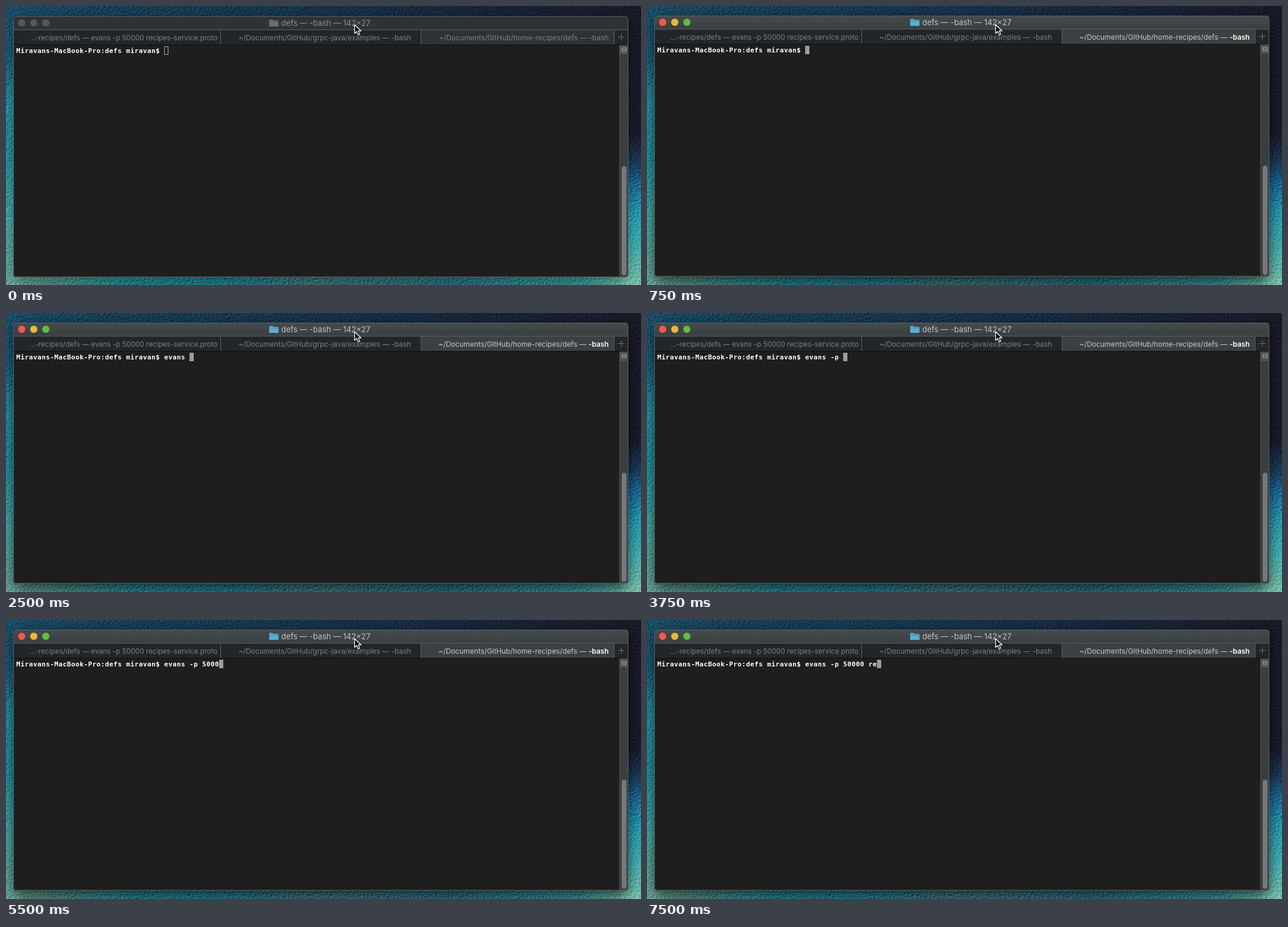
These frames come from a looping animation (1052 px wide and 463 px high, 8 s). An HTML page:

```html
<!DOCTYPE html>
<html lang="en">
<head>
<meta charset="utf-8">
<title>Terminal</title>
<style>
  html, body { margin: 0; width: 100%; height: 100%; overflow: hidden; background: #14283c; }
  svg { display: block; width: 1052px; height: 463px; }
  text { white-space: pre; }
  .ui { font-family: Inter, "Open Sans", sans-serif; font-size: 11.85px; }
  .tab { text-anchor: end; fill: #7d8183; }
  .long { font-size: 11.65px; }
  .title { font-size: 12.9px; fill: #8b9092; }
  .shell { font: 700 11px "DejaVu Sans Mono", "Noto Sans Mono", monospace; letter-spacing: .378px; fill: #fff; }
  .bar { fill: #2e3335; }
  .current { fill: #2d3234; }
  .light { fill: #56595b; }
  .folder { fill: #6a6f71; }
  .focused .bar { fill: url(#barFill); }
  .focused .current { fill: #3b4042; }
  .focused .title { fill: #c3c6c7; }
  .focused .red { fill: #f3584f; }
  .focused .yellow { fill: #e4bb3b; }
  .focused .green { fill: #60bd42; }
  .focused .folder { fill: #58aed2; }
  .focused .here { fill: #c6c9ca; }
  .focused .job { font-weight: 600; fill: #fff; }
  .grain { mix-blend-mode: overlay; }
  .wall { isolation: isolate; }
</style>
</head>
<body>
<svg viewBox="0 0 1052 463" xmlns="http://www.w3.org/2000/svg">
  <defs>
    <linearGradient id="barFill" x2="0" y2="1">
      <stop stop-color="#464b4d"/><stop offset="1" stop-color="#393e40"/>
    </linearGradient>
    <linearGradient id="wallTop">
      <stop stop-color="#1a4c66"/><stop offset=".15" stop-color="#17405a"/>
      <stop offset=".5" stop-color="#16334c"/><stop offset=".75" stop-color="#18253a"/>
      <stop offset="1" stop-color="#1a1a28"/>
    </linearGradient>
    <linearGradient id="wallBottom">
      <stop stop-color="#6aa596"/><stop offset=".08" stop-color="#4d9088"/>
      <stop offset=".2" stop-color="#26848f"/><stop offset=".36" stop-color="#23788c"/>
      <stop offset=".48" stop-color="#3a7478"/><stop offset=".7" stop-color="#2a7080"/>
      <stop offset=".9" stop-color="#3a9095"/><stop offset="1" stop-color="#7cc0aa"/>
    </linearGradient>
    <linearGradient id="wallLeft" x2="0" y2="1">
      <stop stop-color="#1a4c66"/><stop offset=".18" stop-color="#1a5c76"/>
      <stop offset=".34" stop-color="#2291a0"/><stop offset=".52" stop-color="#1f909c"/>
      <stop offset=".75" stop-color="#40a5a2"/><stop offset="1" stop-color="#6aa596"/>
    </linearGradient>
    <linearGradient id="wallRight" x2="0" y2="1">
      <stop stop-color="#1a1a28"/><stop offset=".46" stop-color="#191b2a"/>
      <stop offset=".56" stop-color="#1a3958"/><stop offset=".64" stop-color="#1c6a98"/>
      <stop offset=".74" stop-color="#2799ad"/><stop offset=".86" stop-color="#40aeb0"/>
      <stop offset="1" stop-color="#7cc0aa"/>
    </linearGradient>
    <filter id="rough" x="0" y="0" width="1" height="1" color-interpolation-filters="sRGB">
      <feTurbulence type="fractalNoise" baseFrequency=".3" numOctaves="3" seed="7"/>
      <feDiffuseLighting surfaceScale="1.3" diffuseConstant=".64" lighting-color="#fff">
        <feDistantLight azimuth="225" elevation="52"/>
      </feDiffuseLighting>
    </filter>
    <filter id="blur" x="-10%" y="-20%" width="120%" height="140%">
      <feGaussianBlur stdDeviation="11"/>
    </filter>
    <clipPath id="frame"><rect x="12" y="16" width="1019" height="433" rx="5"/></clipPath>
  </defs>

  <g class="wall">
    <rect width="1052" height="40" fill="url(#wallTop)"/>
    <rect y="430" width="1052" height="33" fill="url(#wallBottom)"/>
    <rect width="24" height="463" fill="url(#wallLeft)"/>
    <rect x="1020" width="32" height="463" fill="url(#wallRight)"/>
    <rect class="grain" width="1052" height="463" filter="url(#rough)"/>
  </g>
  <rect id="shadow" x="12" y="24" width="1019" height="433" rx="5" filter="url(#blur)"/>

  <g id="win">
    <g clip-path="url(#frame)">
      <rect x="12" y="16" width="1019" height="433" fill="#1e1e1e"/>
      <rect class="bar" x="12" y="16" width="1019" height="23"/>
      <rect x="12" y="39" width="1019" height="25" fill="#222628"/>
      <rect class="current" x="688" y="39" width="320" height="24"/>
      <path d="M12 38.5H1031M355.5 39V63M687.5 39V63M1007.5 39V63" stroke="#5b6062" fill="none"/>
      <path d="M12 63.5H1031" stroke="#0d0e0e"/>
      <rect x="1016" y="64" width="15" height="385" fill="#3a3e40"/>
      <path d="M1016.5 64V449" stroke="#4b4f51"/>
      <rect x="1017.5" y="64.5" width="13" height="14" fill="#484c4e" stroke="#5d6163"/>
      <path d="M1020.5 68.5h7v6h-7zM1020.5 71.5h7" fill="none" stroke="#a9acad"/>
      <rect x="1020" y="265" width="8" height="181" rx="4" fill="#74787a"/>
    </g>
    <rect x="12.5" y="16.5" width="1018" height="432" rx="5" fill="none" stroke="#5a5f61"/>

    <circle class="light red" cx="26" cy="27" r="6"/>
    <circle class="light yellow" cx="46" cy="27" r="6"/>
    <circle class="light green" cx="66" cy="27" r="6"/>
    <path class="folder" d="M436 23q0-1.5 1.5-1.5h4l1.5 1.5h7q1.5 0 1.5 1.5v7.5q0 1-1 1h-13.500q-1 0-1-1z"/>
    <path d="M436.5 25h14.5" stroke="#000" stroke-opacity=".22"/>
    <text class="ui title" x="456" y="32">defs — -bash — 142×27</text>

    <text class="ui tab long" x="350.5" y="55.5">…-recipes/defs — evans -p 50000 recipes-service.proto</text>
    <text class="ui tab" x="671" y="55.5">~/Documents/GitHub/grpc-java/examples — -bash</text>
    <text class="ui tab here" x="998.5" y="55.5">~/Documents/GitHub/home-recipes/defs — <tspan class="job">-bash</tspan></text>
    <path d="M1014 50.5h11M1019.5 45v11" stroke="#6b6f71"/>

    <text id="line" class="shell" x="17" y="77"></text>
    <rect id="caret"/>
  </g>

  <path d="M577.5 31v14.5l3.4-3.2 2.5 5.7 2.6-1.1-2.5-5.6h4.6z" fill="#111" stroke="#fff" stroke-width="1.2" stroke-linejoin="round"/>
</svg>
<script>
  const LOOP = 8000, SETTLE = 500, FOCUS = 750, CELL = 7, LEFT = 17;
  const PROMPT = "Miravans-MacBook-Pro:defs miravan$ ";
  const COMMAND = "evans -p 50000 re";
  // [time in ms, characters typed by then]
  const KEYS = [
    [1750, 1], [2000, 3], [2250, 4], [2500, 6], [3500, 7], [3750, 9], [4750, 11],
    [5000, 12], [5500, 13], [6000, 14], [6500, 15], [7250, 16], [7500, 17]
  ];
  const $ = id => document.getElementById(id);
  const win = $("win"), line = $("line"), caret = $("caret"), shadow = $("shadow");
  const set = (el, attrs) => {
    for (const name in attrs) el.setAttribute(name, attrs[name]);
  };
  const typedAt = t => KEYS.reduce((n, [at, count]) => t >= at ? count : n, 0);
  let last = "";

  function draw(t) {
    const focused = t >= FOCUS, drop = t < SETTLE ? 1 : 0, typed = typedAt(t);
    const state = [focused, drop, typed].join();
    if (state === last) return;
    last = state;

    set(win, { class: focused ? "focused" : "", transform: `translate(0 ${drop})` });
    set(shadow, { opacity: focused ? 0.62 : 0.35 });
    line.textContent = PROMPT + COMMAND.slice(0, typed);
    const x = LEFT + CELL * (PROMPT.length + typed);
    set(caret, focused
      ? { x, y: 66, width: 7, height: 14, fill: "#9d9d9d", stroke: "none" }
      : { x: x + 0.5, y: 66.5, width: 6, height: 13, fill: "none", stroke: "#a8a8a8" });
  }

  function tick(now) {
    draw(now % LOOP);
    requestAnimationFrame(tick);
  }
  draw(0);
  requestAnimationFrame(tick);
</script>
</body>
</html>
```
